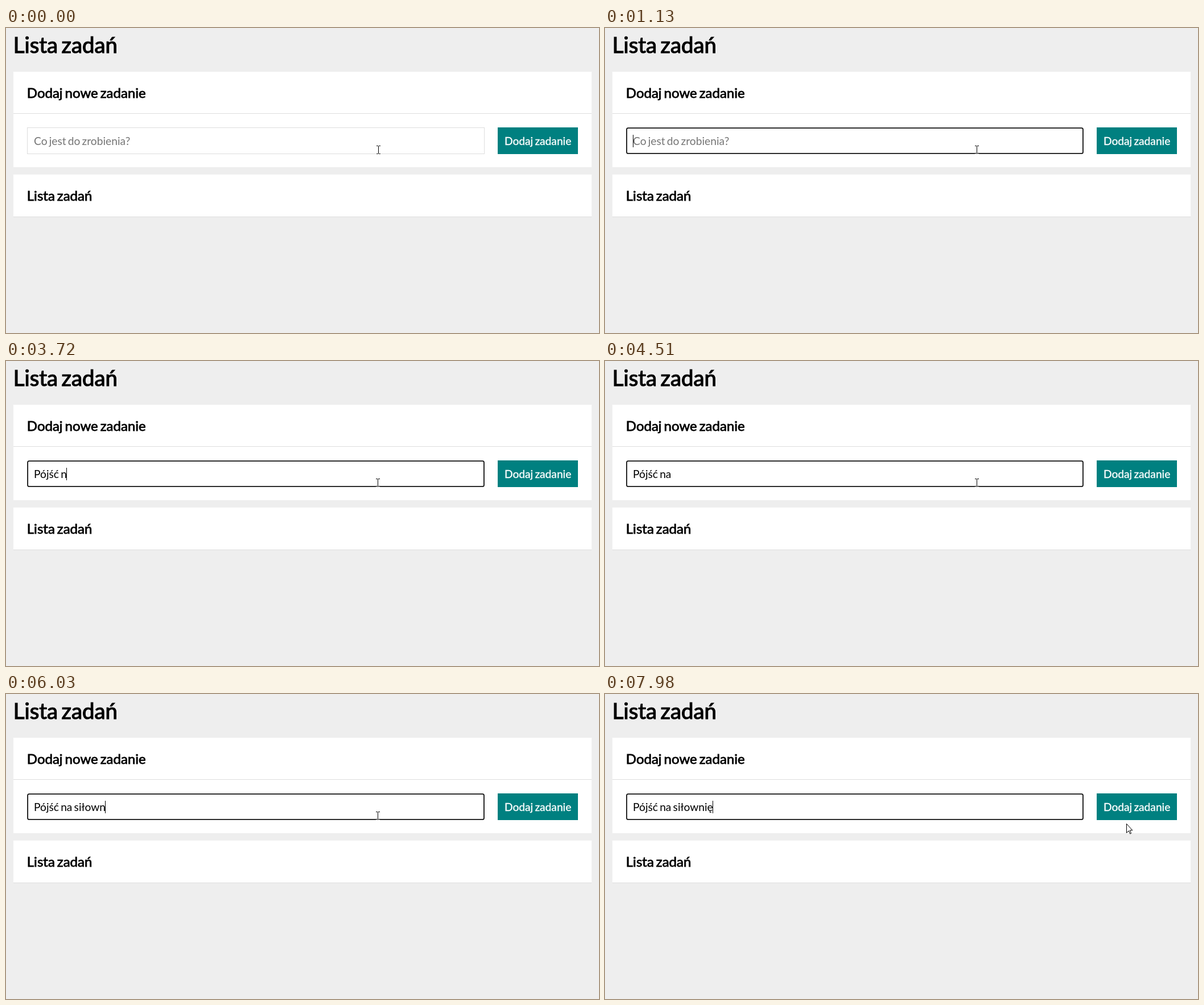
Recreate the animation shown at these times as an HTML page. Size 1042 by 537 pixels, loop 8 s.

```html
<!DOCTYPE html>
<html lang="pl">
<head>
<meta charset="utf-8">
<title>Lista zadań</title>
<style>
  html, body { margin: 0; width: 100%; height: 100%; overflow: hidden; background: #eee; }
  svg { display: block; width: 100%; height: 100%; font: 19.2px Lato, sans-serif; }
  text { white-space: pre; word-spacing: -.09em; }
  .title { font-size: 38.4px; stroke: #000; stroke-width: 1.2px; }
  .heading { font-size: 24px; stroke: #000; stroke-width: .8px; }
  .label { fill: #fff; stroke: #fff; stroke-width: .35px; }
  .panel { fill: #fff; }
  .line { fill: none; stroke: #ddd; }
  #ring { fill: none; stroke: #101010; stroke-width: 1.8; }
  #beam { fill: none; stroke: #fff; mix-blend-mode: difference; }
  #arrow { fill: #fff; stroke: #000; }
</style>
</head>
<body>
<svg>
  <rect width="100%" height="100%" fill="#eee"/>
  <text class="title" x="12.8" y="44">Lista zadań</text>

  <rect class="panel" x="13" y="77" width="1016" height="168"/>
  <path class="line" d="M13 150.5h1016"/>
  <text class="heading" x="36.8" y="123">Dodaj nowe zadanie</text>
  <rect id="border" class="line" x="37.5" y="175.5" width="803" height="46"/>
  <rect id="ring" x="38.1" y="176.1" width="801.8" height="44.8" rx="2.5"/>
  <text id="entry" x="49" y="206"></text>
  <rect id="caret" y="188" width="1" height="22"/>
  <rect x="864" y="175" width="141" height="47" fill="#008080"/>
  <text class="label" x="876" y="206">Dodaj zadanie</text>

  <rect class="panel" x="13" y="258" width="1016" height="75"/>
  <path class="line" d="M13 332.5h1016"/>
  <text class="heading" x="36.8" y="304">Lista zadań</text>

  <path id="beam" d="M-3 -6.5h3m1 0h3M.5 -6v13M-3 7.5h3m1 0h3"/>
  <path id="arrow" d="M.5 .5v16l3.7 -3.6 2.4 5.3 2 -.9 -2.4 -5.3h4.6z"/>
</svg>
<script>
const LOOP = 8000, FOCUS = 70, BLINK = 530;
const TASK = 'Pójść na siłownię';
const KEY_TIMES = [1330, 1860, 2600, 2930, 3190, 3520, 3720, 3850, 3980,
                   4710, 4910, 5240, 5640, 5900, 6030, 6160, 6510];
const MOVE = { start: 7770, step: 70, count: 4, from: [653, 214], to: [916, 228] };

const [border, ring, entry, caret, beam, arrow] =
  ['border', 'ring', 'entry', 'caret', 'beam', 'arrow'].map(id => document.getElementById(id));
const show = (el, visible) => el.setAttribute('visibility', visible ? 'visible' : 'hidden');

function drawField(t) {
  const focused = t >= FOCUS;
  const typed = KEY_TIMES.filter(k => k <= t).length;
  const lastInput = typed ? KEY_TIMES[typed - 1] : FOCUS;
  entry.textContent = typed ? TASK.slice(0, typed) : 'Co jest do zrobienia?';
  entry.setAttribute('fill', typed ? '#000' : '#757575');
  caret.setAttribute('x', typed ? Math.floor(49 + entry.getComputedTextLength()) : 49);
  show(border, !focused);
  show(ring, focused);
  show(caret, focused && Math.floor((t - lastInput) / BLINK) % 2 === 0);
}

function drawPointer(t) {
  const { start, step, count, from, to } = MOVE;
  const moves = Math.min(count, Math.max(0, Math.floor((t - start) / step) + 1));
  const eased = (1 - Math.cos(Math.PI * moves / count)) / 2;
  const [x, y] = from.map((a, i) => Math.round(a + (to[i] - a) * eased));
  const overField = x < 841;
  const pointer = overField ? beam : arrow;
  pointer.setAttribute('transform', `translate(${t < FOCUS ? x + 1 : x} ${y})`);
  show(beam, overField);
  show(arrow, !overField);
}

function draw() {
  const t = performance.now() % LOOP;
  drawField(t);
  drawPointer(t);
  requestAnimationFrame(draw);
}
draw();
</script>
</body>
</html>
```
